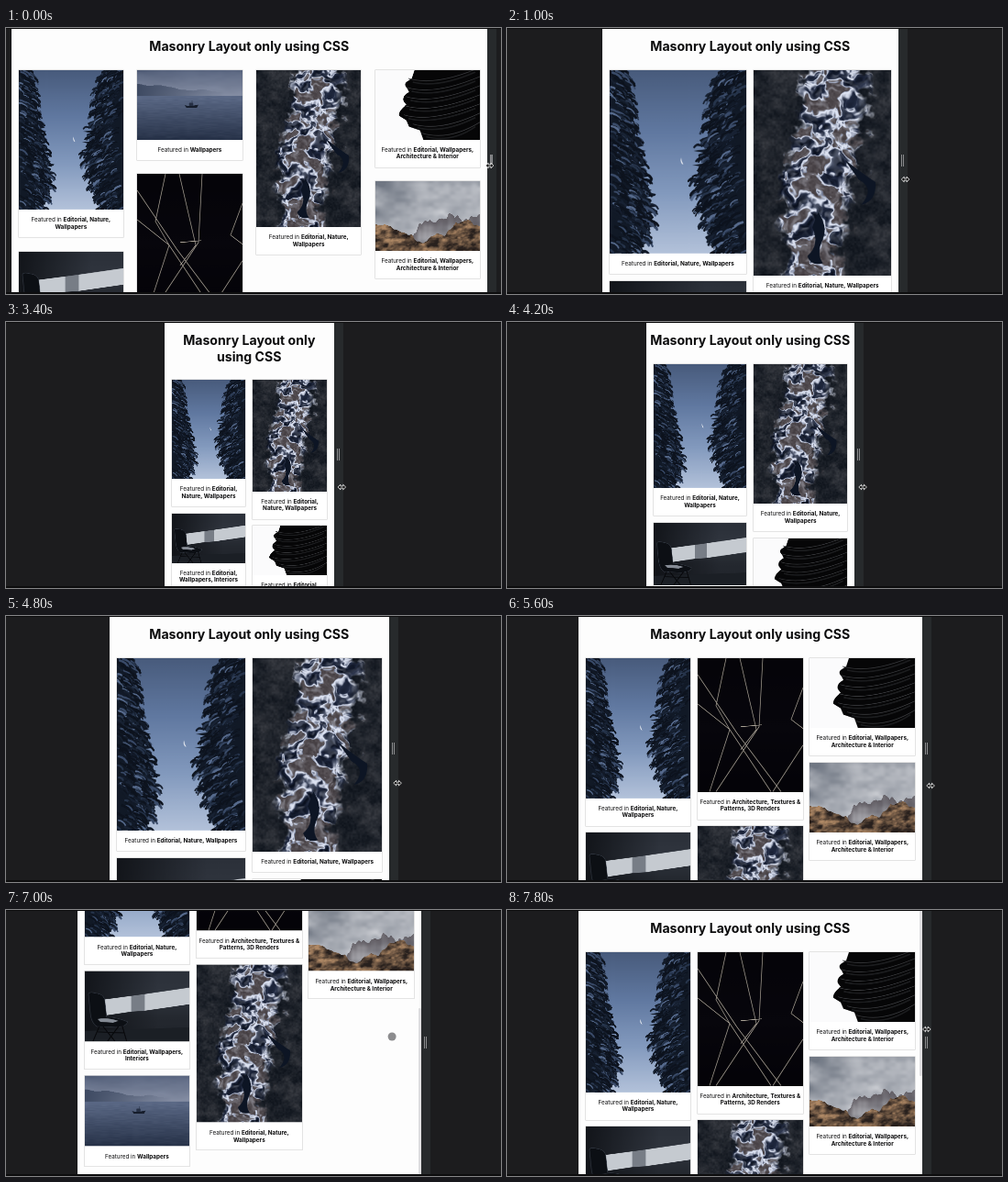
An HTML page with a canvas that plays this animation: 540 px wide and 290 px high, repeating every 8 s.

```html
<!DOCTYPE html>
<html lang="en">
<head>
<meta charset="utf-8">
<title>Masonry layout</title>
<style>
  html, body { margin: 0; width: 100%; height: 100%; overflow: hidden; background: #1c1c1e; }
  #stage { position: absolute; left: 0; top: 0; width: 540px; height: 290px; overflow: hidden; background: #1c1c1e; font-family: Inter, Roboto, sans-serif; color: #0b0b0c; }
  #stage::before, #stage::after { content: ""; position: absolute; left: 0; width: 100%; background: #0d0d0e; z-index: 2; }
  #stage::before { top: 0; height: 1px; }
  #stage::after { bottom: 0; height: 2px; }
  #page { position: absolute; top: 0; height: 288px; overflow: hidden; background: #fdfdfd; }
  #content { padding-top: 11.2px; }
  h1 { margin: 0 3px 16.6px; font-size: 14.1px; line-height: 17.8px; font-weight: 700; text-align: center; }
  #columns { display: flex; align-items: flex-start; margin: 0 7.6px; }
  .column { flex: 1 1 0; min-width: 0; }
  .card { background: #fff; box-shadow: 0 0 0 .5px #c9c9c9; }
  .card canvas { display: block; width: 100%; }
  .card p { margin: 0; padding: 8px 0 6.6px; font-size: 6.3px; line-height: 7.7px; text-align: center; }
  #thumb { position: absolute; right: 0; width: 2.5px; height: 181px; border-radius: 1px; background: #dfdfe1; }
  #strip { position: absolute; top: 0; width: 10px; height: 290px; background: #272a2c; }
  #grip { position: absolute; left: 3.5px; top: 138px; width: 1px; height: 13px; border: solid #8b8c8e; border-width: 0 1px; }
  #cursor, #dot { position: absolute; left: 0; top: 0; }
  #dot { width: 9px; height: 9px; margin: -4.5px; border-radius: 50%; background: #8c8c8e; }
  #cursor { margin: -4px -5px; }
</style>
</head>
<body>
<div id="stage">
  <div id="page">
    <div id="content"><h1>Masonry Layout only using CSS</h1><div id="columns"></div></div>
    <div id="thumb"></div>
  </div>
  <div id="strip"><div id="grip"></div></div>
  <svg id="cursor" width="10" height="8" viewBox="-5 -4 10 8">
    <path d="M-4.3 0L-1.4-2.8V-1H1.4V-2.8L4.3 0L1.4 2.8V1H-1.4V2.8Z" fill="#111" stroke="#fff" stroke-width=".8"/>
  </svg>
  <div id="dot"></div>
</div>
<script>
const LOOP = 8000, STEP = 200, CENTER = 265.3, UNIT = 115, DENSITY = 2;
const $ = id => document.getElementById(id);
const clamp = v => Math.max(0, Math.min(1, v));
const mix = (a, b, k) => a.map((v, i) => v + (b[i] - v) * clamp(k));

// Piecewise linear lookup in [[x, y], ...]
function track(points, x) {
  const i = points.findIndex(p => p[0] > x);
  if (i < 0) return points[points.length - 1][1];
  if (!i) return points[0][1];
  const [a, b] = [points[i - 1], points[i]];
  return a[1] + (b[1] - a[1]) * (x - a[0]) / (b[0] - a[0]);
}

function seeded(seed) {
  return () => (seed = (seed * 1664525 + 1013904223) >>> 0) / 4294967296;
}

function hash(x, y) {
  const n = Math.sin(x * 127.1 + y * 311.7) * 43758.5453;
  return n - Math.floor(n);
}

function noise(x, y) {
  const ix = Math.floor(x), iy = Math.floor(y);
  const ease = v => v * v * (3 - 2 * v);
  const u = ease(x - ix), v = ease(y - iy);
  const row = j => hash(ix, j) * (1 - u) + hash(ix + 1, j) * u;
  return row(iy) * (1 - v) + row(iy + 1) * v;
}

const fractal = (x, y) => noise(x, y) * .55 + noise(x * 2.1, y * 2.1) * .3 + noise(x * 4.3, y * 4.3) * .15;

// Colours every pixel with a function of unit coordinates
function shade(c, color) {
  const { width, height } = c.canvas, data = c.createImageData(width, height);
  for (let y = 0, i = 0; y < height; y++)
    for (let x = 0; x < width; x++, i += 4)
      data.data.set([...color(x / DENSITY, y / DENSITY), 255], i);
  c.putImageData(data, 0, 0);
}

function gradient(c, h, ...colors) {
  const g = c.createLinearGradient(0, 0, 0, h);
  colors.forEach((color, i) => g.addColorStop(i / (colors.length - 1), color));
  c.fillStyle = g;
  c.fillRect(0, 0, UNIT, h);
}

function shape(c, path, fill, stroke, width = 1) {
  const p = new Path2D(path);
  if (fill) { c.fillStyle = fill; c.fill(p); }
  if (stroke) { c.strokeStyle = stroke; c.lineWidth = width; c.stroke(p); }
}

function trees(c, h) {
  gradient(c, h, '#485b7c', '#6078a0', '#8299bd', '#b3c2da');
  shape(c, 'M60 73Q59 78 62 79Q60.5 76 60 73', '#e4e8ef');
  const rand = seeded(7);
  const tones = ['#0d131e', '#121a28', '#182233', '#26344b', '#3a4b69', '#566a8c'];
  const sides = [
    { root: 0, dir: 1, reach: [[0, 19], [40, 25], [80, 32], [112, 40], [130, 39], [153, 31]] },
    { root: UNIT, dir: -1, reach: [[0, 28], [25, 36], [60, 42], [95, 47], [120, 42], [153, 29]] }
  ];
  for (const { root, dir, reach } of sides) {
    const edge = y => track(reach, y) * (.76 + .27 * ((y / 13 + .2 * Math.sin(y)) % 1));
    c.beginPath();
    c.moveTo(root, 0);
    for (let y = 0; y <= h; y += 1.5) c.lineTo(root + dir * edge(y), y);
    c.lineTo(root, h);
    c.fillStyle = '#111926';
    c.fill();
    c.lineCap = 'round';
    for (let i = 0; i < 720; i++) {
      const y = rand() * h, x = root + dir * edge(y) * Math.sqrt(rand());
      const len = 2 + rand() * 5;
      c.strokeStyle = tones[Math.floor(rand() * rand() * 1.5 * tones.length) % tones.length];
      c.lineWidth = .8 + rand() * 1.4;
      c.beginPath();
      c.moveTo(x - dir * len, y - len * .4);
      c.quadraticCurveTo(x, y - 1, x + dir * 1.5, y + len * .6);
      c.stroke();
    }
  }
}

function chair(c, h) {
  gradient(c, h, '#2b3039', '#30353e', '#24282f', '#20242b');
  const shadow = c.createLinearGradient(0, 0, UNIT, 0);
  shadow.addColorStop(0, '#0c0e12cc');
  shadow.addColorStop(.7, '#0c0e1200');
  c.fillStyle = shadow;
  c.fillRect(0, 0, UNIT, h);
  shape(c, 'M20 31L51 27V44L17 49ZM66 25L115 18V36L66 43Z', '#c5cad0');
  shape(c, 'M51 27L66 25V43L51 44Z', '#777d86');
  shape(c, 'M0 65L115 61V77H0Z', '#1b1f25');
  shape(c, 'M4 25Q5 22 12 24Q21 25 22 32L24 50Q35 50 47 55Q46 60 34 61L13 60Q7 56 6 45Z', '#0c0f14', '#343a44', .6);
  shape(c, 'M14 52Q25 50 37 54L31 56L17 55Z', '#858b95');
  shape(c, 'M16 60L9 76M20 60L33 76M37 60L25 76M41 59L46 76M14 66L43 67', null, '#08090c', 1.1);
}

function boat(c, h) {
  shade(c, (x, y) => {
    const mist = fractal(x / 30, y / 10) * 18 - 9;
    const ridge = 17 + x * .09 - 4 * noise(x / 12, 3);
    if (y < 28) {
      const sky = mix([87, 99, 125], [130, 139, 161], y / 26).map(v => v + mist);
      return y > ridge ? mix([62, 74, 98], sky, x / 95) : sky;
    }
    const ripple = noise(x / 7, y * 1.2) * 9 - 4;
    return mix([91, 105, 134], [38, 49, 71], (y - 28) / (h - 28)).map(v => v + ripple);
  });
  shape(c, 'M52 38.5Q59 40 67 37.8L65 41.5H54Z', '#161d2b');
  shape(c, 'M57 36H61V39H57ZM60 33V38', '#263044', '#263044', .5);
}

function lines(c, h) {
  gradient(c, h, '#050409', '#07060c', '#040308');
  shape(c, 'M31 0L20 52L35 78L13 146M46 0L64 78L47 100M71 0L67 75L20 146M115 32L102 67L115 77' +
    'M0 18L43 82L91 146M0 50L35 78L80 146M115 95L82 146M47 75L70 73', null, '#aaa396', .7);
}

function river(c) {
  const center = [[0, 70], [35, 63], [75, 60], [115, 50], [172, 50]];
  const half = [[0, 26], [50, 32], [90, 35], [135, 27], [172, 25]];
  shade(c, (x, y) => {
    const wx = x + 16 * (fractal(x / 16, y / 16 + 9) - .5);
    const wy = y + 16 * (fractal(x / 16 + 5, y / 16) - .5);
    const rough = fractal(x / 9, y / 9);
    const inside = 1 - Math.abs(wx - track(center, y)) / track(half, y) + (rough - .5) * .9;
    const grain = noise(x / 1.6, y / 1.6) * 22;
    const rock = mix([14, 19, 27], [58, 60, 66], rough * 1.3 - .35).map(v => v + grain * .6);
    const foam = fractal(wx / 10 + 20, wy / 10);
    const vein = clamp(1 - Math.abs(foam - .5) * 11);
    const base = foam > .56 ? [66 + grain, 60 + grain, 64 + grain] : mix([10, 16, 30], [72, 86, 125], (foam - .25) * 2.4);
    const water = mix(base, [220, 226, 241], vein + noise(wx / 3, wy / 3) * .55 - .2);
    return mix(rock, water, inside * 4);
  });
  shape(c, 'M76 75Q90 86 102 94Q103 110 90 113Q102 99 88 92ZM54 119Q62 130 58 142Q52 154 58 162Q48 165 45 156Q56 146 49 132Z', '#0d1524');
}

function tower(c, h) {
  c.fillStyle = '#fbfbfc';
  c.fillRect(0, 0, UNIT, h);
  shape(c, 'M43 0L40 9L34 13Q31 16 35 20L37 24Q29 28 31 34L34 38Q25 45 26 50L34 55L37 62L49 66L53 77H115V0Z', '#060607');
  for (let i = 0; i < 7; i++) {
    const y = 9 + i * 10, x = 36 - i * 1.2 + Math.max(0, i - 4) * 11;
    shape(c, `M${x} ${y}Q${x + 30} ${y + 9} 115 ${y - 12}`, null, '#37383b', .8);
    shape(c, `M${x + 5} ${y + 4}Q${x + 33} ${y + 11} 110 ${y - 7}`, null, '#1c1d1f', 1.6);
  }
}

function rocks(c) {
  const rim = [[0, 49], [10, 46], [24, 53], [37, 58], [47, 66], [56, 67], [64, 59], [76, 58], [88, 46], [101, 43], [115, 50]];
  const peak = [[38, 65], [48, 45], [55, 40], [64, 44], [74, 38], [84, 33], [94, 40], [115, 35]];
  shade(c, (x, y) => {
    const cloud = fractal(x / 26, y / 18);
    let color = mix([112, 119, 131], [209, 211, 216], cloud * 1.25 - .2 + (y - 20) / 150);
    const ridge = track(peak, x) + noise(x / 3, 8) * 5;
    if (x > 38 && y > ridge) color = mix([83, 77, 83], color, (y - ridge) / 45 + cloud * .4);
    const top = track(rim, x) + noise(x / 4, 2) * 4 - 2;
    if (y > top) {
      const face = fractal(x / 7 + y / 20, y / 5);
      color = mix([40, 32, 29], [174, 136, 101], face * 1.9 - .42 - (y - top) / 110);
    }
    return color;
  });
}

const nature = 'Editorial, Nature, Wallpapers', building = 'Editorial, Wallpapers, Architecture & Interior';
const cards = [
  [trees, 4 / 3, nature],
  [chair, 2 / 3, 'Editorial, Wallpapers, Interiors'],
  [boat, 2 / 3, 'Wallpapers'],
  [lines, 1.275, 'Architecture, Textures & Patterns, 3D Renders'],
  [river, 1.5, nature],
  [tower, 2 / 3, building],
  [rocks, 2 / 3, building]
].map(([paint, ratio, tags]) => {
  const card = document.createElement('div'), canvas = document.createElement('canvas');
  const caption = document.createElement('p'), bold = document.createElement('b');
  card.className = 'card';
  canvas.width = UNIT * DENSITY;
  canvas.height = Math.round(UNIT * ratio * DENSITY);
  const c = canvas.getContext('2d');
  c.scale(DENSITY, DENSITY);
  paint(c, UNIT * ratio);
  bold.textContent = tags;
  caption.append('Featured in ', bold);
  card.append(canvas, caption);
  return card;
});

const groups = { 2: [4, 3], 3: [3, 2, 2], 4: [2, 2, 1, 2] };
let shown = 0;

function arrange(count) {
  if (count === shown) return;
  shown = count;
  const gap = count === 4 ? 15.2 : 7.8;
  let next = 0;
  $('columns').style.gap = gap + 'px';
  $('columns').replaceChildren(...groups[count].map(size => {
    const column = document.createElement('div');
    column.className = 'column';
    column.append(...cards.slice(next, next += size));
    return column;
  }));
  cards.forEach(card => card.style.marginBottom = gap + 'px');
}

const leftEdge = [[0, 6], [200, 13], [400, 37], [600, 66], [800, 91], [1000, 104], [1200, 108], [1400, 113],
  [1600, 127], [1800, 149], [2000, 168], [2400, 172], [3000, 175], [3600, 172], [3800, 168], [4200, 152],
  [4400, 141], [4800, 113], [5000, 98], [5200, 86], [5400, 80], [5600, 78]];
const pointerOffset = [[0, 3], [1000, 8], [1200, 7.5], [2000, 2.5], [2400, 5], [3600, 9.5], [5800, 9.5],
  [6000, 2], [6200, -28], [7000, -32], [7400, -20], [7600, -1], [7800, 5.3]];
const pointerY = [[0, 150], [1000, 165], [2000, 180], [4200, 180], [5600, 185], [5800, 185], [6000, 176],
  [6200, 142], [7000, 137.5], [7800, 130]];
const scrollTop = [[6200, 0], [6400, 28], [6600, 100], [6800, 158], [7000, 169.5], [7200, 160], [7400, 75], [7600, 8], [7800, 0]];

function render(time) {
  const t = Math.floor(time % LOOP / STEP) * STEP;
  const left = track(leftEdge, t), width = 2 * (CENTER - left), right = left + width;
  const scroll = track(scrollTop, t);
  arrange(width > 468 ? 4 : width > 351 ? 3 : 2);
  $('page').style.left = left + 'px';
  $('page').style.width = width + 'px';
  $('content').style.transform = `translateY(${-scroll}px)`;
  $('thumb').style.top = scroll * .63 + 'px';
  $('thumb').style.visibility = t > 6200 ? 'visible' : 'hidden';
  $('strip').style.left = right + 'px';
  $('grip').style.background = t === 0 || (t >= 1800 && t <= 2400) ? '#77787a' : 'none';
  const touching = t >= 6200 && t < 7400;
  const place = `translate(${right + track(pointerOffset, t)}px, ${track(pointerY, t)}px)`;
  for (const [id, visible] of [['cursor', !touching], ['dot', touching]]) {
    $(id).style.transform = place;
    $(id).style.visibility = visible ? 'visible' : 'hidden';
  }
}

const start = performance.now();
function tick() {
  render(performance.now() - start);
  requestAnimationFrame(tick);
}
tick();
</script>
</body>
</html>
```
